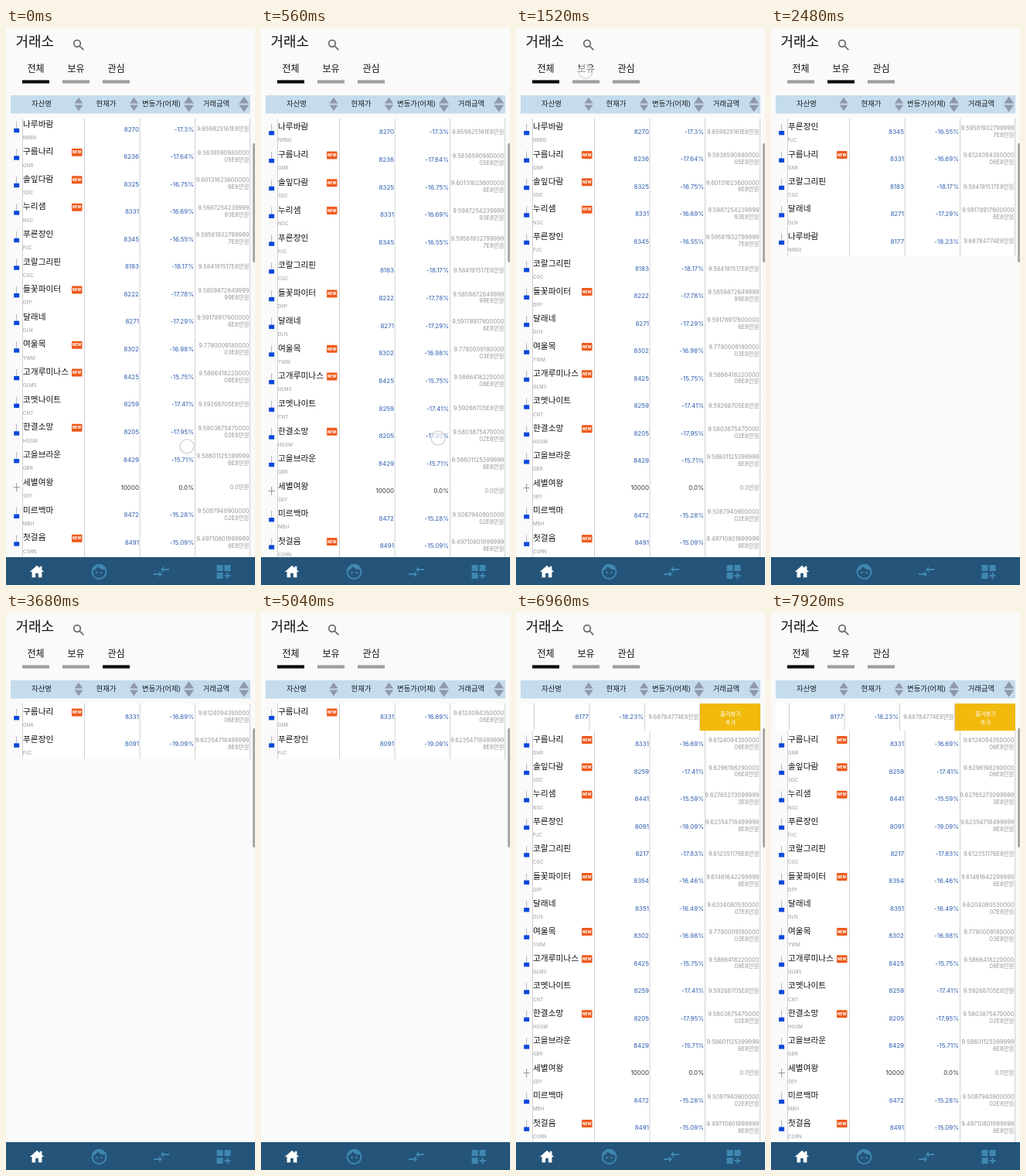
Write an HTML page that moves like this. It is 322 px wide and 720 px high and loops after 8 s.

```html
<!DOCTYPE html>
<html lang="ko">
<head>
<meta charset="utf-8">
<title>거래소</title>
<style>
html, body { margin: 0; width: 100%; height: 100%; overflow: hidden; background: #fafafa; }
svg { display: block; width: 322px; height: 720px; font-family: Inter, "Noto Sans CJK KR", "Noto Sans CJK", sans-serif; }
.title { font-size: 18px; fill: #111; }
.tab { font-size: 12px; fill: #111; text-anchor: middle; }
.head { font-size: 9.4px; fill: #1c2126; text-anchor: middle; }
.name { font-size: 10.7px; fill: #111; }
.code { font-size: 6.2px; fill: #999; }
.num { font-size: 8px; fill: #2f5fb0; text-anchor: end; }
.flat { fill: #333; }
.amt { font-size: 7.5px; fill: #969696; text-anchor: end; }
.new { font-size: 4.6px; font-weight: 800; fill: #fff; text-anchor: middle; }
.act { font-size: 7.4px; fill: #fff; text-anchor: middle; }
</style>
</head>
<body>
<svg id="stage" viewBox="0 0 322 720">
  <defs><clipPath id="view"><rect x="6" y="117" width="310.5" height="567"/></clipPath></defs>
  <rect width="322" height="720" fill="#fafafa"/>
  <text class="title" x="12.5" y="23.5">거래소</text>
  <g fill="none" stroke="#666" stroke-width="1.7"><circle cx="92" cy="20" r="4.3"/><path d="M95 23l5.3 5.3"/></g>
  <g id="tabs"></g>
  <rect x="6" y="87" width="310" height="23.5" fill="#c5dcec"/>
  <g id="head"></g>
  <g clip-path="url(#view)"><g id="list"></g></g>
  <path d="M322 149h-1.5q-1.5 0-1.5 2v150q0 2 1.5 2h1.5z" fill="#a9a9a9"/>
  <rect y="684" width="322" height="36" fill="#245479"/>
  <g id="nav"></g>
  <circle id="touch" r="9" fill="#fff" fill-opacity=".65" stroke="#cfcfd3" stroke-opacity=".8" stroke-width="1.6"/>
</svg>
<script>
const LOOP = 8000, TOP = 117, ROW = 35.43, VIEW = 567;
const $ = id => document.getElementById(id);
const text = (cls, x, y, s) => `<text class="${cls}" x="${x}" y="${y}">${s}</text>`;
const rect = (x, y, w, h, fill, extra = '') =>
  `<rect x="${x}" y="${y}" width="${w}" height="${h}" fill="${fill}" ${extra}/>`;

// name, code, new badge, price and amount ("|" breaks the line), later price and amount
const assets = [
  ['나루바람', 'NRBO', 0, 8270, '9.659825161', 8177, '9.68784774'],
  ['구름나리', 'GNR', 1, 8236, '9.5838590980000|05', 8331, '9.6124094350000|06'],
  ['솔잎다람', 'SDC', 1, 8325, '9.60131623600000|6', 8259, '9.6296198290000|06'],
  ['누리샘', 'NSC', 1, 8331, '9.5987254239999|93', 8441, '9.62765273099999|3'],
  ['푸른장인', 'PJC', 0, 8345, '9.59581932799999|7', 8091, '9.62354718499999|8'],
  ['코랄그리핀', 'CGC', 0, 8183, '9.584191517', 8217, '9.612351176'],
  ['들꽃파이터', 'DFP', 1, 8222, '9.5859872649999|99', 8354, '9.61461642299999|8'],
  ['달래네', 'DLN', 0, 8271, '9.59178917600000|6', 8351, '9.6204080530000|07'],
  ['여울목', 'YWM', 1, 8302, '9.7780009180000|03'],
  ['고개루미나스', 'GLMS', 1, 8425, '9.5866418220000|08'],
  ['코멧나이트', 'CNT', 0, 8259, '9.59268705'],
  ['한결소망', 'HGSM', 1, 8205, '9.5803875470000|02'],
  ['고을브라운', 'GBR', 0, 8429, '9.58601125399999|6'],
  ['세별여왕', 'SBY', 0, 10000, '0.0'],
  ['미르백마', 'MBH', 0, 8472, '9.5087940900000|02'],
  ['첫걸음', 'CGRN', 1, 8491, '9.49710801999999|8']
];

function row([name, code, fresh, p0, a0, p1 = p0, a1 = a0], late, swipe) {
  const price = late ? p1 : p0, flat = price === 10000;
  const lines = ((late ? a1 : a0) + (flat ? '' : 'E8') + '만원').split('|');
  const num = flat ? 'num flat' : 'num';
  const h = ROW + (swipe ? 0 : .8);
  let s = rect(swipe ? 6 : 22, 0, swipe ? 310 : 294, h, '#fff');
  for (const x of [21.5, 101.5, 173, 244.5, 315.5]) s += rect(x - .5, 0, 1, h, '#d0d0d3');
  s += flat
    ? '<path d="M9.500 17h8.5M13.7 11.5v11" stroke="#8a8a8a" stroke-width=".9"/>'
    : rect(13.3, 7, .8, 9.5, '#9aa3b5') + rect(10.2, 16, 7, 5.4, '#0b47d9');
  s += text('name', 22, 14.2, name) + text('code', 22, 30.3, code);
  if (fresh) s += rect(85, 6.5, 13.5, 10, '#ee5a1c', 'rx="1"') + text('new', 91.7, 13.2, 'NEW');
  s += text(num, 172, 19.9, price) + text(num, 243, 19.9, (flat ? '0.0' : (price - 10000) / 100) + '%');
  lines.forEach((l, k) => s += text('amt', 314.5, lines.length > 1 ? 14.7 + k * 8.9 : 19.7, l));
  return `<g class="row"><g ${swipe ? 'id="swipe"' : ''}>${s}</g></g>`;
}

const action = rect(238, TOP, 78, ROW, '#f1ba0c') + text('act', 277.5, 133, '즐겨찾기') + text('act', 277.5, 144, '추가');
const pick = (...items) => items.map(([n, late]) => row(assets[n], late)).join('');
const views = {
  all: assets.map(a => row(a, false)).join(''),
  heldOld: pick([4, 0], [1, 0], [5, 0], [7, 0], [0, 0]),
  held: pick([4, 0], [1, 1], [5, 0], [7, 0], [0, 1]),
  liked: pick([1, 1], [4, 1]),
  allNew: action + assets.map((a, i) => row(a, true, i === 0)).join('')
};

$('tabs').innerHTML = ['전체', '보유', '관심'].map((s, i) =>
  text('tab', 38.5 + 52 * i, 56.5, s) + rect(21 + 52 * i, 67.4, 35, 4.2, '#9e9e9e', 'class="bar"')).join('');
const bars = document.querySelectorAll('.bar');

$('head').innerHTML = [['자산명', 46, 94, 5.6], ['현재가', 129.5, 165.5, 5.6], ['변동가(어제)', 201, 236.5, 6.5], ['거래금액', 272, 307.7, 6.5]]
  .map(([s, x, ix, r]) => text('head', x, 101.2, s) +
    `<path d="M${ix - r} 97.4L${ix} ${96.4 - r * 1.2}L${ix + r} 97.4zM${ix - r} 99.6L${ix} ${100.6 + r * 1.2}L${ix + r} 99.6z" fill="#8f99ab"/>`).join('');

const icon = (x, k, color, body) =>
  `<g transform="translate(${x} 703) scale(${k}) translate(-12 -12)" fill="${color}">${body}</g>`;
const blue = '#3f87b2';
$('nav').innerHTML =
  icon(40, .92, '#fff', '<path d="M19 9.3V4h-3v2.6L12 3 2 12h3v8h5v-6h4v6h5v-8h3z"/>') +
  icon(120.5, 1, blue, `<circle cx="12" cy="12" r="9" fill="none" stroke="${blue}" stroke-width="2"/>
    <path d="M3 11q5-1.5 7-6q4 5 11 4l-1-3-5-4H9L4 6z"/><circle cx="9" cy="13" r="1.3"/><circle cx="15" cy="13" r="1.3"/>`) +
  icon(201, 1, blue, '<path d="M9 14H2v2h7v3l4-4-4-4zM15 13v-3h7V8h-7V5l-4 4z"/>') +
  icon(281.5, 1, blue, '<path d="M3 3h8v8H3zM13 3h8v8h-8zM3 13h8v8H3zM18 13h-2v3h-3v2h3v3h2v-3h3v-2h-3z"/>');

// steps: [time, value]
const tabSteps = [[0, 0], [1760, 1], [3520, 2], [4960, 0]];
const viewSteps = [[0, 'all'], [1840, 'heldOld'], [2160, 'held'], [3640, 'liked'], [5120, 'allNew']];
const stretch = [[0, -3.2], [160, -4], [360, 0], [560, 4], [960, 8], [1040, 8], [1280, 0]];
const drag = [[5840, 0], [6240, 47], [6500, 78]];
// each touch: [time, x, y]
const touches = [
  [[-200, 236, 570], [0, 234, 541], [240, 228, 480], [560, 229, 530], [960, 244, 626], [1010, 244, 630]],
  [[1440, 90, 56], [1840, 90, 56]],
  [[3280, 142, 56], [3600, 142, 56]],
  [[4560, 39, 56], [5020, 39, 56]],
  [[5600, 222, 141], [5840, 219, 141], [6240, 169, 141], [6500, 134, 141], [6640, 132, 141]]
];

const step = (list, t) => list.filter(([at]) => at <= t).pop()[1];
function tween(list, t, k = 1) {
  const n = list.findIndex(p => p[0] > t);
  if (n < 0) return list[list.length - 1][k];
  if (n === 0) return list[0][k];
  const a = list[n - 1], b = list[n];
  return a[k] + (b[k] - a[k]) * (t - a[0]) / (b[0] - a[0]);
}

// overscroll: the pulled edge stays put, the far end moves most
function rowTop(i, pull) {
  const u = (i + .3) * ROW / VIEW;
  return TOP + i * ROW + pull * Math.sin((pull < 0 ? 1 - u : u) * Math.PI / 2);
}

let shown;
function draw(t) {
  const tab = step(tabSteps, t), view = step(viewSteps, t);
  bars.forEach((b, i) => b.setAttribute('fill', i === tab ? '#0c0c0c' : '#9e9e9e'));
  if (view !== shown) $('list').innerHTML = views[shown = view];

  const pull = tween(stretch, t);
  document.querySelectorAll('.row').forEach((r, i) => r.setAttribute('transform', `translate(0 ${rowTop(i, pull)})`));
  if (view === 'allNew') $('swipe').setAttribute('transform', `translate(${-tween(drag, t)} 0)`);

  const path = touches.find(p => t >= p[0][0] && t < p[p.length - 1][0]);
  const dot = $('touch');
  dot.setAttribute('opacity', path ? Math.min(1, (t - path[0][0]) / 100, (path[path.length - 1][0] - t) / 120) : 0);
  if (path) {
    dot.setAttribute('cx', tween(path, t, 1));
    dot.setAttribute('cy', tween(path, t, 2));
  }
}

const start = performance.now();
function tick() {
  draw((performance.now() - start) % LOOP);
  requestAnimationFrame(tick);
}
tick();
</script>
</body>
</html>
```
